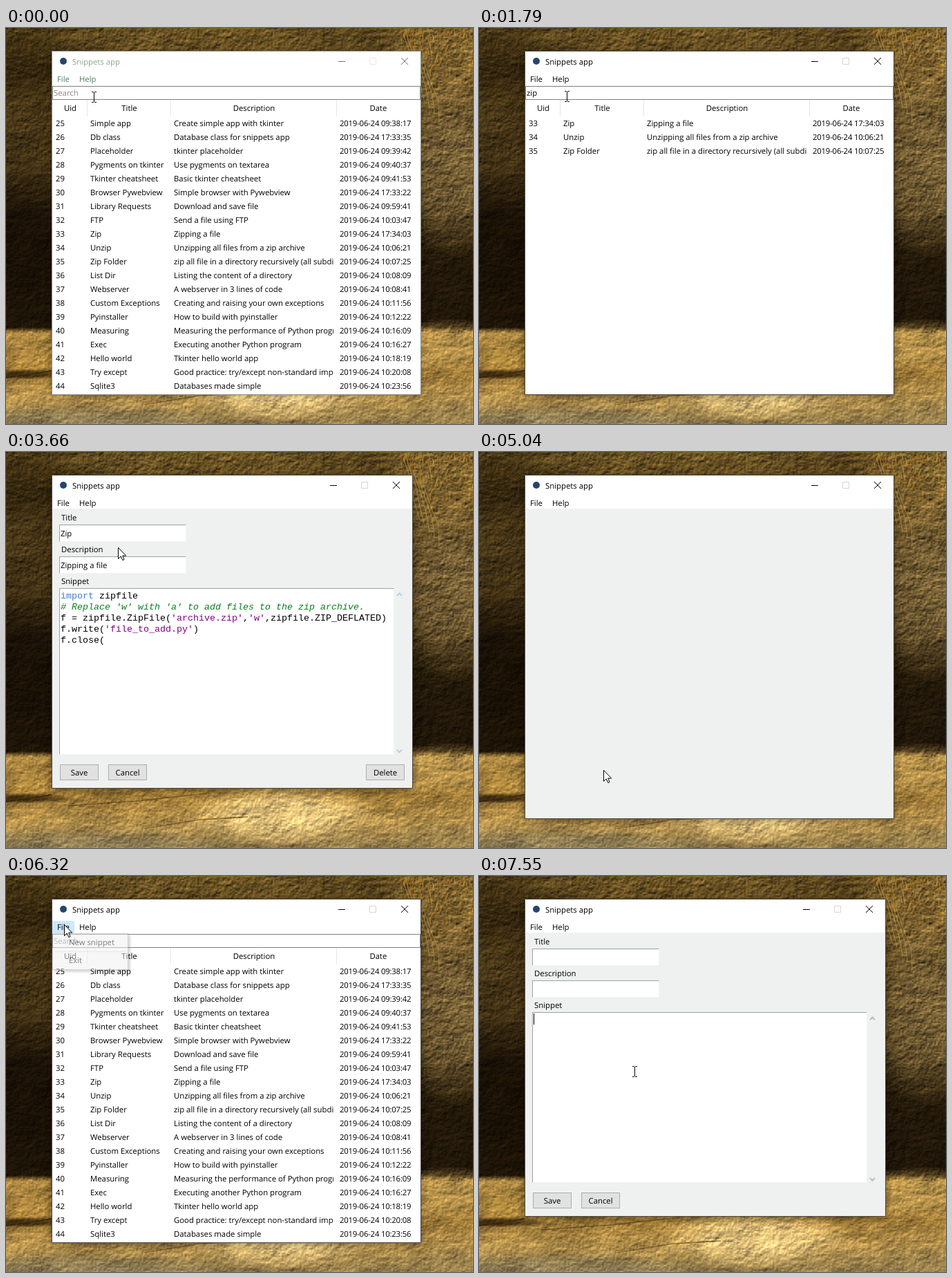
An HTML page with a canvas for the animation above (8000 ms loop, 676 by 573 pixels).

```html
<!DOCTYPE html>
<html lang="en">
<head>
<meta charset="utf-8">
<title>Snippets app</title>
<style>
html, body { margin: 0; width: 100%; height: 100%; overflow: hidden; background: #2a1d08; }
#stage { position: absolute; left: 0; top: 0; width: 676px; height: 573px; overflow: hidden;
  font: 11.35px "Open Sans", "Noto Sans", sans-serif; color: #000; text-rendering: geometricPrecision; cursor: none; }
#stage div, #stage svg, canvas { position: absolute; box-sizing: border-box; }
.t { line-height: 20px; white-space: pre; }
.mid { transform: translateX(-50%); }
#win { left: 66px; top: 33px; border: 1px solid #4e4a40;
  background: linear-gradient(#fff 48px, #eff0f0 48px); box-shadow: 0 3px 12px rgba(0, 0, 0, .4); }
.idle #win { border-color: #8b8b80; box-shadow: 0 2px 9px rgba(0, 0, 0, .25); }
.idle .title { color: #8ea68c; }
.idle .menu { color: #4d7d60; }
.idle #controls { opacity: .55; }
#fileHot { left: 67px; top: 65px; width: 32px; height: 18px; background: #cce8ff; }
#list .sheet { left: 67px; top: 83px; width: 533px; height: 447px; background: #fff; }
#list .search { left: 67px; top: 84px; width: 533px; height: 20px; background: #fff; border: 1px solid #80827e; }
.hint { color: #868686; }
.caret { display: inline-block; width: 1px; height: 14px; background: #000; vertical-align: -3px; }
.rule { width: 1px; height: 24px; top: 104px; background: #e5e5e5; }
#rows { left: 68px; top: 128px; width: 532px; }
#rows .row { position: relative; width: 531px; height: 20px; }
#rows .row.hot { background: #0078d7; color: #fff; }
.row .t { overflow: hidden; }
.date { letter-spacing: -.2px; }
.entry { background: #fff; border: 1px solid; border-color: #a0a0a0 #f4f4f4 #f4f4f4 #a0a0a0; left: 77px; }
.btn { width: 56px; height: 23px; line-height: 23px; text-align: center; background: #e1e1e1; border: 1px solid #adadad; }
.btn.hover { background: #e5f1fb; border-color: #0078d7; }
.btn.press { background: #cce4f7; border-color: #005499; }
#code { left: 79px; top: 201px; white-space: pre; text-rendering: auto;
  font: 13.333px/16px "Courier New", "Liberation Mono", monospace; }
#code b { font-weight: 400; color: #3f7bd6; }
#code i { color: #0a7d1c; }
#code u { text-decoration: none; color: #800080; }
#popup { left: 67px; top: 83px; width: 110px; height: 53px; background: #f0f0f0; border: 1px solid #a8a8a8;
  box-shadow: 3px 3px 3px rgba(0, 0, 0, .3); }
#popup .sep { left: 3px; top: 25px; width: 102px; height: 1px; background: #d0d0d0; }
#item { left: 69px; top: 86px; width: 105px; height: 19px; background: #0078d7; color: #fff; line-height: 20px; padding-left: 22px; white-space: pre; }
</style>
</head>
<body>
<div id="stage"></div>
<script>
const W = 676, H = 573, LOOP = 8000;
const stage = document.getElementById('stage');

function add(parent, cls, style = {}, html = '') {
  const el = document.createElement('div');
  el.className = cls;
  for (const k in style) el.style[k] = typeof style[k] === 'number' ? style[k] + 'px' : style[k];
  el.innerHTML = html;
  parent.append(el);
  return el;
}
function layer(id, parent = stage) {
  const el = add(parent, '');
  el.id = id;
  return el;
}
const text = (parent, left, y, str, cls = '') => add(parent, 't ' + cls, { left, top: y - 9 }, str);
const show = (el, on) => { el.style.display = on ? '' : 'none'; };

// Desktop: soft rock tones with seeded grain
function hash(x, y) {
  let n = Math.imul(x, 374761393) + Math.imul(y, 668265263);
  n = Math.imul(n ^ n >>> 13, 1274126177);
  return ((n ^ n >>> 16) >>> 0) / 4294967296;
}
function noise(x, y) {
  const ix = Math.floor(x), iy = Math.floor(y);
  const ease = v => v * v * (3 - 2 * v), u = ease(x - ix), v = ease(y - iy);
  const a = hash(ix, iy), b = hash(ix + 1, iy), c = hash(ix, iy + 1), d = hash(ix + 1, iy + 1);
  return a + (b - a) * u + (c - a + (a - b - c + d) * u) * v;
}
function drawDesktop() {
  const cv = document.createElement('canvas');
  cv.width = W; cv.height = H;
  stage.append(cv);
  const g = cv.getContext('2d');
  const base = g.createLinearGradient(0, 0, 0, H);
  [[0, '#5c471e'], [.15, '#4e3b19'], [.35, '#3f2f14'], [.6, '#261b0a'], [.755, '#1d1407'],
   [.772, '#a5823f'], [.87, '#a27d38'], [.93, '#b08d4a'], [1, '#927c4b']].forEach(s => base.addColorStop(...s));
  g.fillStyle = base;
  g.fillRect(0, 0, W, H);

  const blob = (x, y, rx, ry, color, alpha) => {
    g.save();
    g.translate(x, y);
    g.scale(rx, ry);
    const r = g.createRadialGradient(0, 0, 0, 0, 0, 1);
    r.addColorStop(0, color); r.addColorStop(.4, color); r.addColorStop(1, color + '00');
    g.globalAlpha = alpha;
    g.fillStyle = r;
    g.fillRect(-1, -1, 2, 2);
    g.restore();
  };
  blob(20, 315, 110, 115, '#150d04', .8);
  blob(20, 50, 100, 80, '#2a1e0a', .6);
  blob(300, 10, 230, 50, '#735a28', .6);
  blob(640, 50, 110, 100, '#8f7138', .75);
  blob(650, 200, 95, 130, '#7b6439', .85);
  blob(650, 380, 95, 50, '#20160a', .7);
  blob(640, 460, 110, 40, '#c39d53', .7);
  blob(400, 525, 140, 45, '#ebcb84', .85);
  blob(30, 501, 70, 8, '#35240b', .85);
  blob(120, 572, 230, 28, '#8d7c55', .85);
  blob(660, 565, 90, 30, '#8f7847', .6);

  const line = (color, width, pts) => {
    g.strokeStyle = color;
    g.lineWidth = width;
    g.beginPath();
    pts.forEach(p => g.lineTo(...p));
    g.stroke();
  };
  line('#3d2b10', 2, [[0, 506], [30, 502], [66, 496]]);
  line('#6f5424', 1.5, [[90, 512], [190, 505], [290, 494]]);
  line('#7a5d2a', 1.5, [[200, 545], [280, 532], [350, 528]]);

  // Grain lit from the upper left
  const img = g.getImageData(0, 0, W, H), px = img.data;
  const rough = (x, y) => .6 * noise(x / 7, y / 5) + .4 * noise(x / 2.6 + 40, y / 2.2);
  for (let y = 0; y < H; y++) for (let x = 0; x < W; x++) {
    const amp = y > 440 ? .7 : 1.2, i = (y * W + x) * 4;
    const k = 1 + amp * (rough(x, y) - rough(x - 1.5, y - 2)) + .3 * (noise(x / 26, y / 13) - .5);
    for (let c = 0; c < 3; c++) px[i + c] *= k;
  }
  g.putImageData(img, 0, 0);

  for (let i = 0; i < 110; i++) {
    const x = 570 + 106 * hash(i, 1), y = 75 * hash(i, 2) * hash(i, 3);
    line(hash(i, 4) > .5 ? '#b9781699' : '#d8a84088', 1, [[x, y], [x + 8 * hash(i, 5) - 4, y + 4 + 9 * hash(i, 6)]]);
  }
  for (let i = 0; i < 5; i++) {
    const x = 575 + i * 7, y = 8 + i * 9;
    line('#c9a65a99', 1, [[x, y], [x + 12, y + 35], [x + 15 + i * 2, y + 62], [x + 24, y + 90]]);
  }
}
drawDesktop();

// Window frame
const win = layer('win');
add(stage, '', { left: 78, top: 43, width: 10, height: 10, background: '#24466b', borderRadius: '50%' });
text(stage, 96, 49, 'Snippets app', 'title');
const fileHot = layer('fileHot');
text(stage, 74, 74, 'File', 'menu');
text(stage, 106, 74, 'Help', 'menu');
const controls = layer('controls');
controls.style.top = '40px';
controls.innerHTML = `<svg width="110" height="20" fill="none" stroke="#000">
  <path d="M1 8.5h10"/><path stroke="#d2d8c8" d="M46.5 3.5h9v9h-9z"/><path d="M92 3l10 10M102 3l-10 10"/></svg>`;

// Snippet table
const list = layer('list');
add(list, 'sheet');
add(list, 'search');
const query = text(list, 69, 94, '');
[[93, 'Uid'], [178.5, 'Title'], [359, 'Description'], [539, 'Date']].forEach(([x, s]) => text(list, x, 116, s, 'mid'));
[117, 238, 478].forEach(left => add(list, 'rule', { left }));
const table = layer('rows', list);
const rows = `Simple app|Create simple app with tkinter|09:38:17
Db class|Database class for snippets app|17:33:35
Placeholder|tkinter placeholder|09:39:42
Pygments on tkinter|Use pygments on textarea|09:40:37
Tkinter cheatsheet|Basic tkinter cheatsheet|09:41:53
Browser Pywebview|Simple browser with Pywebview|17:33:22
Library Requests|Download and save file|09:59:41
FTP|Send a file using FTP|10:03:47
Zip|Zipping a file|17:34:03
Unzip|Unzipping all files from a zip archive|10:06:21
Zip Folder|zip all file in a directory recursively (all subdirectories)|10:07:25
List Dir|Listing the content of a directory|10:08:09
Webserver|A webserver in 3 lines of code|10:08:41
Custom Exceptions|Creating and raising your own exceptions|10:11:56
Pyinstaller|How to build with pyinstaller|10:12:22
Measuring|Measuring the performance of Python programs|10:16:09
Exec|Executing another Python program|10:16:27
Hello world|Tkinter hello world app|10:18:19
Try except|Good practice: try/except non-standard imports|10:20:08
Sqlite3|Databases made simple|10:23:56`.split('\n').map((s, i) => {
  const [title, about, time] = s.split('|'), el = add(table, 'row');
  text(el, 4, 10, 25 + i);
  text(el, 54, 10, title);
  text(el, 175, 10, about).style.width = '231px';
  text(el, 415, 10, '2019-06-24 ' + time, 'date');
  return { el, title };
});

// Snippet form
const form = layer('form');
['Title', 'Description', 'Snippet'].forEach((s, i) => text(form, 80, 95 + 46 * i, s));
[105, 151].forEach(top => add(form, 'entry', { top, width: 184, height: 25 }));
const area = add(form, 'entry', { top: 197, width: 485 });
const filled = [text(form, 79, 118, 'Zip'), text(form, 79, 164, 'Zipping a file'), layer('code', form)];
filled[2].innerHTML = `<b>import</b> zipfile
<i># Replace 'w' with 'a' to add files to the zip archive.</i>
f = zipfile.ZipFile(<u>'archive.zip'</u>,<u>'w'</u>,zipfile.ZIP_DEFLATED)
f.write(<u>'file_to_add.py'</u>)
f.close(`;
const formCaret = add(form, '', { left: 79, top: 199, width: 1, height: 16, background: '#000' });
const arrow = d => add(form, '', { left: 565, height: 6 }, `<svg width="9" height="6" fill="none" stroke-width="2"><path d="${d}"/></svg>`);
const up = arrow('M1 5l3.5-3.5L8 5'), down = arrow('M1 1l3.5 3.5L8 1');
up.style.top = '203px';
const [save, cancel, remove] = [[78, 'Save'], [148, 'Cancel'], [521, 'Delete']].map(([left, s]) => add(form, 'btn', { left }, s));

// File menu
const popup = layer('popup');
text(popup, 23, 12, 'New snippet');
add(popup, 'sep');
text(popup, 23, 38, 'Exit');
const item = layer('item');
item.textContent = 'New snippet';

const pointer = add(stage, '', {}, `<svg width="14" height="21" style="left:0;top:0"><path d="M.5.5v16l3.8-3.5 2.5 5.6 2.3-1-2.4-5.5h5z" fill="#fff" stroke="#000"/></svg>`);
const beam = add(stage, '', {}, `<svg width="7" height="16" style="left:-3px;top:-8px" fill="none" stroke="#000"><path d="M0 .5h2.5l1 1 1-1H7M0 15.5h2.5l1-1 1 1H7M3.5 1v14"/></svg>`);

// [time, changed state]
const steps = [
  [0, { view: 'list', idle: true, hint: true, typed: '', caret: false, filter: '', hot: false,
        at: [127, 100], beam: true, file: false, popup: 0, item: 0, cancel: '' }],
  [60, { idle: false, hint: false, caret: true, at: [127, 99] }],
  [700, { caret: false }],
  [930, { caret: true }],
  [1250, { typed: 'z' }],
  [1390, { typed: 'zi' }],
  [1560, { typed: 'zip' }],
  [1790, { filter: 'zip', caret: false }],
  [1860, { caret: true }],
  [2490, { caret: false }],
  [2720, { caret: true }],
  [2870, { beam: false, at: [143, 121] }],
  [2950, { at: [165, 152] }],
  [3100, { at: [163, 143], caret: false }],
  [3180, { at: [162, 138] }],
  [3260, { hot: true }],
  [3660, { view: 'edit' }],
  [4200, { at: [163, 190] }],
  [4280, { at: [167, 290] }],
  [4360, { at: [172, 390] }],
  [4440, { at: [176, 441] }],
  [4590, { at: [178, 453], cancel: 'hover' }],
  [4670, { at: [180, 460] }],
  [4820, { cancel: 'press' }],
  [4900, { cancel: 'hover' }],
  [5040, { view: 'blank', cancel: '' }],
  [5130, { view: 'list', hint: true, typed: '', filter: '', hot: false }],
  [5370, { at: [172, 415] }],
  [5450, { at: [150, 310] }],
  [5520, { at: [126, 205] }],
  [5600, { at: [109, 137] }],
  [5680, { at: [95, 95] }],
  [5760, { at: [86, 73], file: true }],
  [5920, { at: [85, 71] }],
  [6000, { at: [84, 70] }],
  [6320, { popup: .5 }],
  [6400, { popup: 1 }],
  [6480, { at: [86, 76] }],
  [6560, { at: [90, 86], item: 1 }],
  [6640, { at: [96, 93] }],
  [6710, { at: [98, 95] }],
  [6940, { popup: 0, item: .8, file: false }],
  [7010, { item: .4 }],
  [7090, { item: 0 }],
  [7160, { view: 'new', at: [112, 125] }],
  [7240, { at: [145, 180] }],
  [7320, { at: [180, 225], beam: true }],
  [7390, { at: [205, 257] }],
  [7470, { at: [220, 277] }],
  [7550, { at: [225, 283] }]
];

function render(s) {
  const isForm = s.view === 'edit' || s.view === 'new', edit = s.view === 'edit';
  const right = isForm ? 589 : 601, bottom = edit ? 487 : isForm ? 493 : 531;
  stage.className = s.idle ? 'idle' : '';
  win.style.width = right - 66 + 'px';
  win.style.height = bottom - 33 + 'px';
  controls.style.left = right - 121 + 'px';
  show(list, s.view === 'list');
  show(form, isForm);
  show(fileHot, s.file);

  query.className = s.hint ? 't hint' : 't';
  query.innerHTML = (s.hint ? 'Search' : s.typed) + (s.caret ? '<span class="caret"></span>' : '');
  rows.forEach(r => {
    show(r.el, r.title.toLowerCase().includes(s.filter));
    r.el.classList.toggle('hot', s.hot && r.title === 'Zip');
  });

  area.style.height = bottom - 246 + 'px';
  down.style.top = bottom - 57 + 'px';
  form.style.stroke = edit ? '#b4d3e8' : '#bcbcbc';
  [save, cancel, remove].forEach(b => { b.style.top = bottom - 35 + 'px'; });
  cancel.className = 'btn ' + s.cancel;
  [...filled, remove].forEach(el => show(el, edit));
  show(formCaret, !edit);

  show(popup, s.popup);
  popup.style.opacity = s.popup;
  show(item, s.item);
  item.style.opacity = s.item;

  show(pointer, !s.beam);
  show(beam, s.beam);
  const cur = s.beam ? beam : pointer;
  cur.style.left = s.at[0] + 'px';
  cur.style.top = s.at[1] + 'px';
}

let last = -1;
const start = performance.now();
function tick() {
  const t = (performance.now() - start) % LOOP;
  let n = 0;
  while (n + 1 < steps.length && steps[n + 1][0] <= t) n++;
  if (n !== last) {
    render(Object.assign({}, ...steps.slice(0, n + 1).map(step => step[1])));
    last = n;
  }
  requestAnimationFrame(tick);
}
tick();
</script>
</body>
</html>
```
